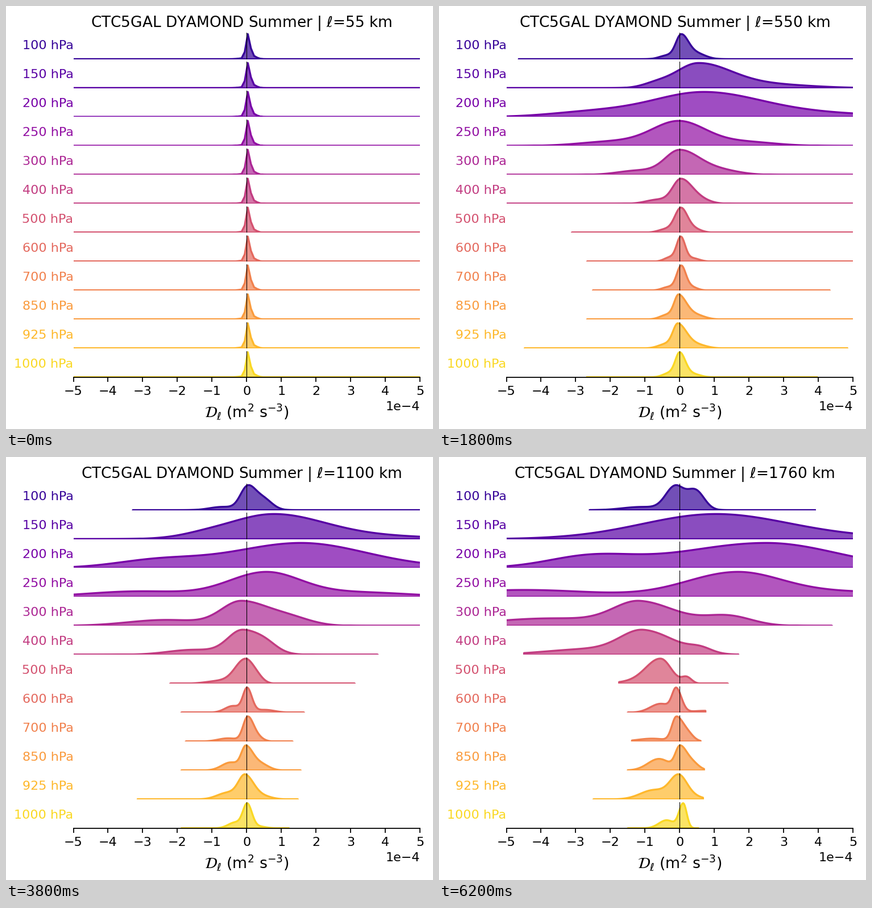
Recreate the animation shown at these times as a matplotlib script. Size 751 by 745 pixels, loop 6.4 s.

```python
import matplotlib.pyplot as plt
import numpy as np
from matplotlib.animation import FuncAnimation
from matplotlib.colors import to_rgba
from matplotlib.patches import Polygon
from matplotlib.ticker import MultipleLocator

W, H, DPI = 751, 745, 160
FRAMES, INTERVAL = 32, 200
LEFT, RIGHT, BOTTOM = 118.5, 728.5, 653.8
ROW_STEP, ROW_HEIGHT = 50.93, 46.3
UNIT = 1e-4
SCALE_STEP, LAST_SCALE = 55, 55 * FRAMES
SPREAD_FRAMES = 6

plt.rcParams["font.family"] = "DejaVu Sans"


class Ridge:
    """A peak with a shoulder on each side that spreads from a spike, then drifts.

    A shape is (peak, left width, right width,
    left shoulder height, place, right shoulder height, place).
    """

    spike = np.array([0.03, 0.055, 0.06, 0.03, -0.15, 0.15, 0.15])

    def __init__(self, pressure, span, early, late, ease=3):
        peak, left, right = early
        self.pressure, self.span, self.ease = pressure, span, ease
        self.early = np.array([peak, left, right, 0.16, peak - 2.2 * left,
                               0.16, peak + 2.2 * right])
        self.late = np.array(late)

    def shape(self, frame):
        if frame < SPREAD_FRAMES:
            return self.spike + (self.early - self.spike) * frame / SPREAD_FRAMES
        u = (frame - SPREAD_FRAMES) / (FRAMES - 1 - SPREAD_FRAMES)
        progress = np.full(len(self.late), u)
        progress[0] = u ** self.ease
        return self.early + (self.late - self.early) * progress

    def curve(self, frame):
        peak, left, right, *shoulders = self.shape(frame)
        # The sampled range and the grid spacing shrink as the scale grows.
        ratio = LAST_SCALE / (SCALE_STEP * (frame + 1))
        lo = max(self.span[0] * ratio ** 0.5, -5.5)
        hi = min(self.span[1] * ratio ** 1.7, 5.5)
        step = max(0.02, 0.09 / (frame + 1))
        x = peak + step * np.arange(np.ceil((lo - peak) / step),
                                    np.floor((hi - peak) / step) + 1)
        y = bell(x, peak, np.where(x < peak, left, right))
        for height, place in zip(shoulders[::2], shoulders[1::2]):
            y += height * bell(x, place, 0.45 * abs(place) + 0.05)
        return x * UNIT, y / y.max()


def bell(x, centre, width):
    return np.exp(-0.5 * ((x - centre) / width) ** 2)


RIDGES = [
    Ridge(100, (-2.6, 3.9), (.04, .14, .2), (-.14, .27, .25, .14, -1.1, .85, .45)),
    Ridge(150, (-9, 9), (.45, .45, .8), (1, 2.1, 2.1, 0, -2, .07, 5), ease=1),
    Ridge(200, (-9, 9), (.4, 1.35, 1.6), (2.5, 2.5, 2, .42, -2.6, 0, 4), ease=1),
    Ridge(250, (-9, 9), (-.1, .68, .7), (1.6, 1.45, 1.3, .3, -4.5, .22, 4.8), ease=1.5),
    Ridge(300, (-9, 4.4), (0, .38, .5), (-1.15, .75, 1.05, .33, -3.7, .42, 1.4)),
    Ridge(400, (-4.5, 1.7), (.03, .18, .24), (-1.05, .65, .9, .25, -2.6, .2, .6)),
    Ridge(500, (-1.75, 1.4), (.03, .14, .17), (-.55, .42, .3, .08, -1.2, .25, .2)),
    Ridge(600, (-1.5, .75), (.03, .12, .12), (-.1, .12, .15, .4, -.55, .08, .72)),
    Ridge(700, (-1.4, .6), (.04, .13, .12), (-.1, .13, .2, .12, -.8, .25, .25)),
    Ridge(850, (-1.5, .7), (-.03, .13, .23), (0, .13, .18, .55, -.6, .4, .33)),
    Ridge(925, (-2.5, .67), (-.05, .13, .25), (-.03, .25, .24, .4, -.75, .1, .42)),
    Ridge(1000, (-1.5, .55), (0, .13, .17), (.1, .12, .1, .33, -.38, 0, .3)),
]

fig = plt.figure(figsize=(W / DPI, H / DPI), dpi=DPI, facecolor="white")
title = fig.text(414.3 / W, 1 - 37 / H, "", ha="center", va="baseline", fontsize=11.85)


def add_row(row, ridge, color):
    base = BOTTOM - ROW_STEP * (len(RIDGES) - 1 - row)
    ax = fig.add_axes([LEFT / W, 1 - base / H, (RIGHT - LEFT) / W, ROW_HEIGHT / H])
    ax.set(xlim=(-5 * UNIT, 5 * UNIT), ylim=(0, 1.05), xticks=[], yticks=[])
    ax.patch.set_visible(False)
    ax.spines[:].set_visible(False)
    ax.text(0, 0.5, f"{ridge.pressure} hPa", color=color, ha="right", va="center",
            fontsize=10, transform=ax.transAxes)
    ax.axvline(0, color="black", lw=0.5)
    return ax, ax.add_patch(Polygon([(0, 0), (0, 1)], fc=to_rgba(color, 0.7), ec=color,
                                    lw=1.5, joinstyle="round"))


colors = plt.get_cmap("plasma")(np.linspace(0, 1, len(RIDGES) + 2)[1:-1])
rows = [add_row(i, *pair) for i, pair in enumerate(zip(RIDGES, colors))]
shapes = [shape for _, shape in rows]

axis = rows[-1][0]
axis.spines["bottom"].set_visible(True)
axis.xaxis.set_major_locator(MultipleLocator(UNIT))
axis.ticklabel_format(axis="x", style="sci", scilimits=(0, 0))
axis.set_xlabel(r"$\mathcal{D}_\ell$ (m$^2$ s$^{-3}$)", fontsize=12)


def update(frame):
    scale = SCALE_STEP * (frame + 1)
    title.set_text(rf"CTC5GAL DYAMOND Summer | $\ell$={scale} km")
    for ridge, shape in zip(RIDGES, shapes):
        x, y = ridge.curve(frame)
        shape.set_xy(np.column_stack([np.r_[x[0], x, x[-1]], np.r_[0, y, 0]]))
    return [title, *shapes]


anim = FuncAnimation(fig, update, frames=FRAMES, interval=INTERVAL, repeat=True,
                     repeat_delay=0, blit=False)
plt.show()
```
